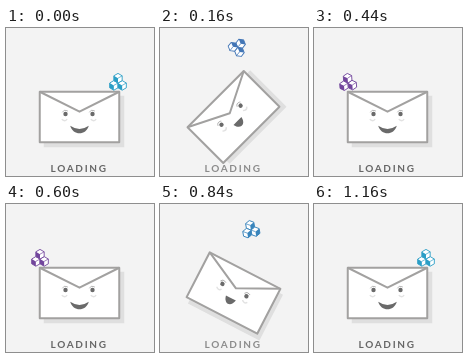
An HTML page with a canvas that plays this animation: 148 px wide and 148 px high, repeating every 1.2 s.

```html
<!DOCTYPE html>
<html>
<head>
<meta charset="utf-8">
<style>
html, body { margin: 0; width: 100%; height: 100%; overflow: hidden; background: #f3f3f3; }
canvas { display: block; }
</style>
</head>
<body>
<canvas id="stage" width="148" height="148"></canvas>
<script>
const canvas = document.getElementById('stage');
const ctx = canvas.getContext('2d');
const SIZE = 148, LOOP = 1200, HALF = 600, STEP = 40, KEY = 80;
const ratio = window.devicePixelRatio || 1;
canvas.width = canvas.height = SIZE * ratio;
canvas.style.width = canvas.style.height = SIZE + 'px';

// Values at every 80 ms of one toss
const tilt = [0, 27.3, 45, 27.3, 9, 0];
const travel = [0, 0.24, 0.44, 0.73, 0.92, 1];
const spin = [0, 135, 202, 230, 290, 360];

const rad = deg => deg * Math.PI / 180;
const mix = (a, b, k) => a + (b - a) * k;

function along(keys, t) {
  const at = i => keys[Math.max(0, Math.min(keys.length - 1, i))];
  const i = Math.floor(t / KEY), k = t / KEY - i;
  const [a, b, c, d] = [at(i - 1), at(i), at(i + 1), at(i + 2)];
  return b + k * ((c - a) + k * ((2 * a - 5 * b + 4 * c - d) + k * (3 * (b - c) + d - a))) / 2;
}

function height(t) {
  const top = 35.5, peak = 162;
  if (t < peak) return top * (1 - Math.pow(1 - t / peak, 2.3));
  return top * Math.max(0, 1 - ((t - peak) / 182) ** 2);
}

function blend(k) {
  const teal = [42, 158, 198], blue = [70, 112, 180], purple = [114, 70, 156];
  const [a, b, f] = k < 0.5 ? [teal, blue, k * 2] : [blue, purple, k * 2 - 1];
  return `rgb(${a.map((v, i) => Math.round(mix(v, b[i], f)))})`;
}

function shape(points, fill, stroke, width) {
  ctx.beginPath();
  points.forEach(([x, y]) => ctx.lineTo(x, y));
  ctx.closePath();
  if (fill) { ctx.fillStyle = fill; ctx.fill(); }
  if (stroke) { ctx.strokeStyle = stroke; ctx.lineWidth = width; ctx.stroke(); }
}

function cube(x, y, r, color) {
  const p = [...Array(6)].map((_, i) => {
    const a = rad(60 * i - 90);
    return [x + r * Math.cos(a), y + r * Math.sin(a)];
  });
  const mid = [x, y];
  shape(p, '#fff', color, 0.9);
  shape([mid, p[3], p[4], p[5]], color);
  shape([mid, p[1]], null, color, 0.4);
}

function cubes(x, y, angle, color) {
  const r = 4.8, w = r * Math.sqrt(3) / 2;
  ctx.save();
  ctx.translate(x, y);
  ctx.rotate(rad(angle));
  cube(-w, r / 2, r, color);
  cube(w, r / 2, r, color);
  cube(0, -r, r, color);
  ctx.restore();
}

function eye(x) {
  ctx.fillStyle = '#6a6a6a';
  ctx.beginPath();
  ctx.arc(x, -3, 2.2, 0, 7);
  ctx.fill();
  ctx.strokeStyle = '#a4a4a4';
  ctx.lineWidth = 0.8;
  ctx.beginPath();
  ctx.arc(x, -3.2, 3.5, rad(205), rad(315));
  ctx.stroke();
  ctx.strokeStyle = '#e2e2e2';
  ctx.lineWidth = 1.4;
  ctx.beginPath();
  ctx.arc(x + Math.sign(x), 0.5, 3, rad(30), rad(150));
  ctx.stroke();
}

function mouth(open) {
  const w = mix(9.3, 5.6, open), y = mix(8.8, 5.6, open);
  const inner = mix(6.4, 0, open), outer = mix(10, 8.6, open);
  ctx.fillStyle = '#6a6a6a';
  ctx.beginPath();
  ctx.moveTo(-w, y);
  ctx.quadraticCurveTo(0, y + inner, w, y);
  ctx.bezierCurveTo(w * 0.7, y + outer, -w * 0.7, y + outer, -w, y);
  ctx.fill();
}

function envelope(angle) {
  const w = 79.5, h = 50.5;
  ctx.save();
  ctx.translate(73.5, 89);
  ctx.rotate(rad(angle));
  ctx.fillStyle = '#dfdfdf';
  ctx.fillRect(-w / 2 + 4, -h / 2 + 4, w + 1, h + 1);
  ctx.fillStyle = '#fff';
  ctx.fillRect(-w / 2, -h / 2, w, h);
  ctx.strokeStyle = '#a2a1a0';
  ctx.lineWidth = 2;
  ctx.lineJoin = 'round';
  ctx.strokeRect(-w / 2, -h / 2, w, h);
  ctx.beginPath();
  ctx.moveTo(-w / 2, -h / 2);
  ctx.lineTo(0, -5.3);
  ctx.lineTo(w / 2, -h / 2);
  ctx.stroke();
  eye(-14);
  eye(13);
  mouth(Math.min(1, (angle / 27) ** 2));
  ctx.restore();
}

function label(moving) {
  ctx.font = 'bold 10px Lato, "Open Sans", sans-serif';
  ctx.letterSpacing = '1.7px';
  ctx.fillStyle = moving ? '#8c8c8c' : '#666';
  ctx.fillText('LOADING', 44.5, 144);
}

function draw(time) {
  const t = time % HALF, back = time >= HALF;
  const dir = back ? 1 : -1;
  const p = Math.max(0, Math.min(1, along(travel, t)));
  const side = back ? 1 - p : p;
  const angle = dir * Math.max(0, along(tilt, t));
  ctx.setTransform(ratio, 0, 0, ratio, 0, 0);
  ctx.fillStyle = '#f3f3f3';
  ctx.fillRect(0, 0, SIZE, SIZE);
  label(Math.abs(angle) > 1);
  envelope(angle);
  cubes(mix(112, 34, side), 55 - height(t), dir * along(spin, t), blend(side));
}

function tick() {
  const time = performance.now() % LOOP;
  draw(Math.floor(time / STEP) * STEP);
  requestAnimationFrame(tick);
}
tick();
</script>
</body>
</html>
```
